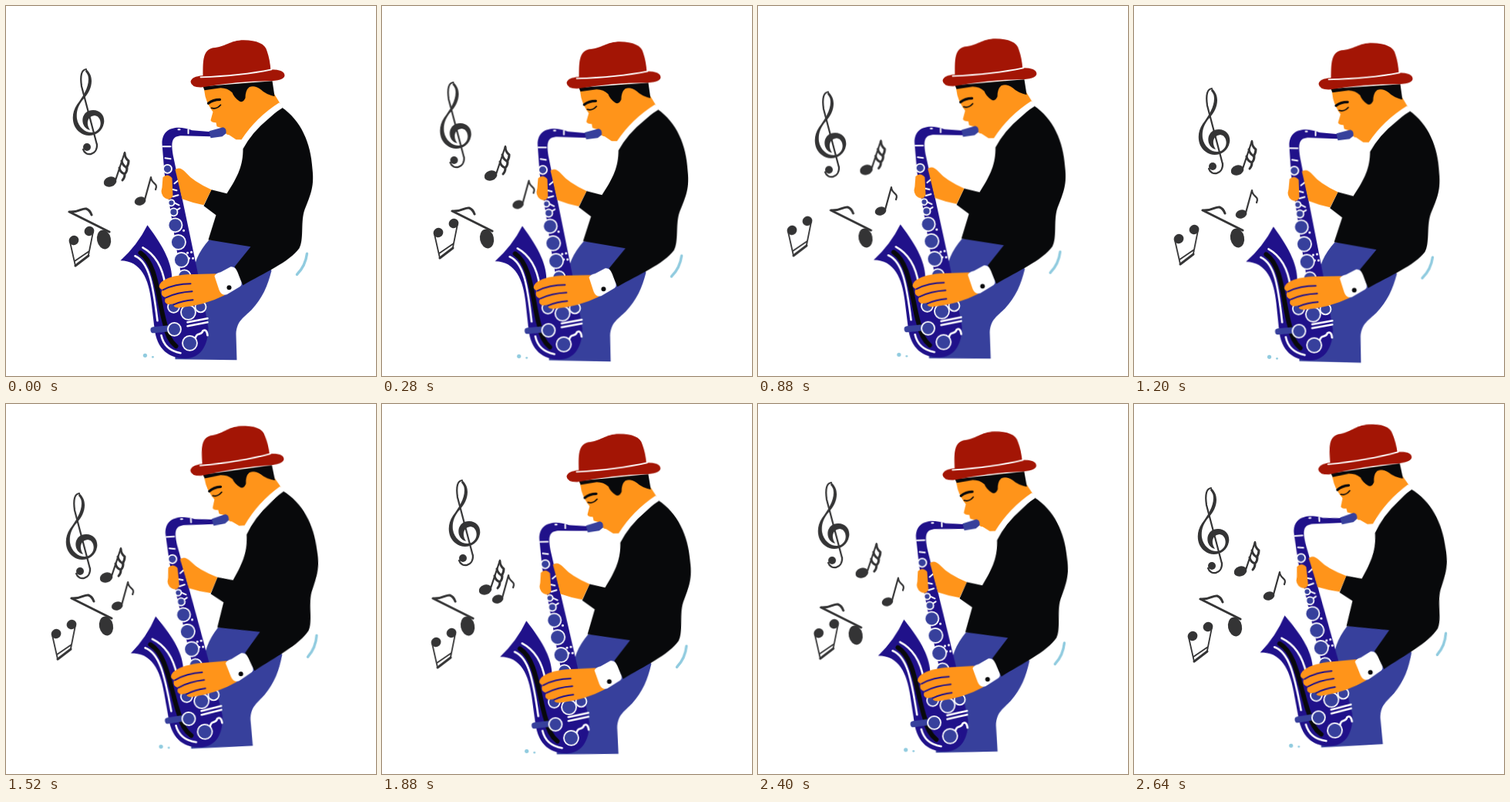
An HTML page for the animation above (2.68 s loop, 480x480 px).

```html
<!DOCTYPE html>
<html lang="en">
<head>
<meta charset="utf-8">
<title>Saxophone player</title>
<style>
  html, body { margin: 0; width: 100%; height: 100%; overflow: hidden; background: #fff; }
  svg { display: block; width: 100vw; height: 100vh; }
  .line { fill: none; stroke-linecap: round; stroke-linejoin: round; }
  .skin { fill: #ff941a; }
  .navy { fill: #20118a; }
  .blue { fill: #37409c; }
  .red { fill: #a31505; }
  .ink { fill: #08090b; }
  .white { stroke: #fff; }
  .sky { fill: #90cbdf; }
  .keys { fill: #37409c; stroke: #fff; stroke-width: 1.8; }
  .notes { fill: #343435; }
  .notes .line { fill: none; stroke: #343435; stroke-width: 2.2; }
  .notes .thin { stroke-width: 1.8; }
  .notes .bold { stroke-width: 3; }

  #man, .notes g { animation: 2680ms linear infinite; }
  #man {
    animation-name: sway;
    animation-timing-function: cubic-bezier(.37, 0, .63, 1);
    transform-origin: 40px 98px;
  }
  #clef { animation-name: clef; }
  #triple { animation-name: triple; }
  #small { animation-name: small; }
  #large { animation-name: large; }
  #pair { animation-name: pair; }

  @keyframes sway {
    0% { transform: rotate(0deg); animation-timing-function: ease-out; }
    5.6% { transform: rotate(1deg); }
    23.1% { transform: rotate(-2.1deg); }
    41.8%, 79.1% { transform: rotate(1.1deg); }
    60.4%, 97.8%, 100% { transform: rotate(-3.8deg); }
  }
  @keyframes clef {
    20.9% { transform: translate(-23px, 34px); }
    44.8% { transform: translate(-3px, 25px); }
    56.7% { transform: translate(-9px, 34px); }
    70.1% { transform: translate(0, 17px); }
    82.1% { transform: translate(-13px, 14px); }
    98.5%, 100% { transform: translate(-4px, 27px); }
  }
  @keyframes triple {
    20.9% { transform: translate(12px, -16px); }
    44.8% { transform: translate(-1px, -15px); }
    56.7% { transform: translate(-5px, -3px); }
    70.1% { transform: translate(-1px, 13px); }
    82.1% { transform: translate(-3px, -7px); }
    98.5%, 100% { transform: translate(3px, -11px); }
  }
  @keyframes small {
    20.9% { transform: translate(5px, 9px); }
    44.8% { transform: translate(-35px, 17px); }
    70.1% { transform: translate(-24px, 0); }
    82.1% { transform: translate(-12px, 10px); }
    98.5%, 100% { transform: translate(1px, -4px); }
  }
  @keyframes large {
    20.9% { transform: translate(18px, -2px); }
    44.8% { transform: translate(7px, -2px); }
    56.7% { transform: translate(3px, -15px); }
    70.1% { transform: translate(-16px, -15px); }
    82.1% { transform: translate(-4px, 6px); }
    98.5%, 100% { transform: translate(4px, -14px); }
  }
  @keyframes pair {
    20.9% { transform: translate(-30px, -20px); }
    32% { transform: translate(-45px, -14px); }
    44.8% { transform: translate(-30px, -2px); }
    56.7% { transform: translate(-23px, -6px); }
    70.1% { transform: translate(-18px, 5px); }
    82.1% { transform: translate(-7px, -10px); }
    98.5%, 100% { transform: translate(-12px, -3px); }
  }
</style>
</head>
<body>
<svg viewBox="0 0 480 480">
  <g id="man"><g transform="translate(-.5 1.3)">
    <path class="blue" d="M264 302 C250 318 243 334 243 352 L220 400 L220 457 L300 458 L299 424 C300 407 309 403 319 393 C333 378 340 362 345 342 L318 306Z"/>

    <!-- head -->
    <path class="skin" d="M257 104 L259 116 Q262 127 269 136 L266 147 Q267 150 273 150 L274 155 L284 158 Q284 166 290 166 L299 172 L307 172 L322 156 L356 125 L348 112 L320 98Z"/>
    <path class="ink" d="M256 103 L346 96 L349 116 Q337 113 331 107 Q323 101 316 104 Q311 108 311 118 Q308 125 303 122 Q296 117 294 111 Q288 105 279 105 L258 108Z"/>
    <path class="line" stroke="#08090b" stroke-width="3.3" d="M263 125 Q269 120 278 120"/>
    <path class="line" stroke="#08090b" stroke-width="1.7" d="M267 131 Q274 133 279 127"/>
    <path class="red" d="M256 91 C256 72 255 56 269 53 C285 52 291 43 309 43 C326 43 337 48 339 57 Q343 68 344 83Z"/>
    <path class="red" d="M240 97 Q241 90 256 89 Q302 88 344 81 Q362 81 362 89 Q361 96 340 96 Q303 96 256 104 Q241 105 240 97Z"/>
    <path class="line white" stroke-width="1.8" d="M253 91 Q306 89 345 81"/>

    <!-- jacket -->
    <path class="ink" d="M358 130 C383 147 396 176 398 210 C401 236 394 246 387 266 C383 281 387 302 381 313 C368 331 335 345 308 361 L297 337 L318 311 L263 302 L273 270 L257 258 L267 237 L287 242 C302 219 308 205 308 184 Q320 162 341 145Z"/>
    <path fill="#fff" d="M306 172 Q325 143 355 124 L359 131 Q328 150 309 179Z"/>

    <!-- saxophone -->
    <path class="navy" d="M267 162 L242 160 C224 153 203 155 203 177 L206 215 L222 315 L231 365 L216 355 C216 333 207 314 184 283 Q171 309 149 329 C176 329 186 354 189 382 L193 416 C196 445 213 456 233 456 C253 456 263 439 263 416 L257 382 L240 300 L218 196 C214 175 215 167 229 167 L267 168Z"/>
    <path class="blue" d="M264 161 L282 156 Q287 157 286 164 L281 168 L266 170Z"/>
    <path class="line" stroke="#08090b" stroke-width="6" d="M175 319 C197 334 197 379 207 412 Q210 431 221 440"/>
    <g class="line white" stroke-width="2.6">
      <path d="M168 323 C186 331 191 358 197 407"/>
      <path d="M178 312 C196 322 204 340 207 360"/>
      <path d="M202 426 Q206 445 227 449"/>
      <path d="M236 409 L262 404 M236 414 L262 409"/>
      <path d="M246 431 C247 421 254 427 256 420 Q261 417 262 426"/>
      <path stroke-width="2" d="M204 181 h10 M237 159 v5 M224 159 h2"/>
      <path stroke-width="2" d="M207 196 l7 1 M219 229 l5 -4 M214 236 l8 2 M217 246 l7 -2 M217 253 l8 4 M221 264 l5 -3"/>
      <path stroke-width="3" d="M231 290 h.1 M236 319 h.1 M241 318 h.1 M238 326 h.1 M243 326 h.1"/>
    </g>
    <path class="line" stroke="#37409c" stroke-width="8" stroke-linecap="butt" d="M192 419 L212 417"/>
    <g class="keys">
      <circle cx="210" cy="210" r="5.5"/>
      <circle cx="215" cy="254" r="4"/>
      <circle cx="218" cy="266" r="5"/>
      <circle cx="220" cy="283" r="9"/>
      <circle cx="224" cy="305" r="9.5"/>
      <circle cx="228" cy="328" r="9.5"/>
      <circle cx="232" cy="349" r="8"/>
      <circle cx="218" cy="389" r="7.5"/>
      <circle cx="253" cy="389" r="7"/>
      <circle cx="237" cy="396" r="9.5"/>
      <circle cx="219" cy="418" r="8.5"/>
      <circle cx="239" cy="436" r="9.5"/>
    </g>

    <!-- hands -->
    <path class="skin" d="M220 211 Q226 206 234 215 Q243 226 267 237 L257 257 Q242 254 229 249 L222 219Z"/>
    <path class="skin" d="M204 221 Q210 215 216 222 L217 245 Q214 252 207 248 Q200 243 203 234Z"/>
    <path class="skin" d="M273 346 L235 347 Q211 349 202 357 Q196 363 203 367 Q200 375 208 377 Q204 383 211 386 L219 385 Q216 391 227 390 Q258 387 284 374Z"/>
    <path class="line" stroke="#20118a" stroke-width="2" d="M204 367 Q220 359 240 359 M208 377 Q223 370 242 369 M218 386 Q230 381 243 380"/>
    <path fill="#fff" d="M271 349 Q273 345 279 344 L292 337 Q298 336 301 344 L306 357 Q307 362 302 364 L287 373 Q280 375 277 367Z"/>
    <circle class="ink" cx="290" cy="364" r="3"/>

    <path class="line" stroke="#90cbdf" stroke-width="3.4" d="M391 320 Q389 336 378 347"/>
    <circle class="sky" cx="181" cy="452" r="2.6"/>
    <circle class="sky" cx="191" cy="454" r="1.4"/>
  </g></g>

  <g class="notes">
    <g id="clef">
      <path class="line" d="M118 180 L98 104 Q95 83 104 82 M118 179 C119 194 103 196 100 186"/>
      <path d="M104 82 C116 92 111 110 101 120 C93 129 91 138 92 146 C94 160 108 167 116 163 C126 158 124 143 115 142 C106 143 103 152 109 161 C97 158 96 141 107 136 C121 132 129 142 127 152 C124 168 106 172 96 164 C85 156 84 140 92 128 C100 117 107 106 107 95 Q107 89 103 85Z"/>
      <circle cx="105" cy="183" r="5"/>
    </g>
    <g id="triple">
      <ellipse cx="135" cy="228" rx="8.5" ry="6.5" transform="rotate(-20 135 228)"/>
      <path class="line" d="M142 226 L154 190"/>
      <path class="line bold" d="M154 191 q0 6 5 10 q0 5 -3 9 M150 201 q1 6 7 9 q0 5 -3 8 M147 210 q1 6 7 8 q0 5 -3 8"/>
    </g>
    <g id="small">
      <ellipse cx="174" cy="253" rx="7.5" ry="5.5" transform="rotate(-18 174 253)"/>
      <path class="line" d="M180 251 L188 222 C188 231 198 229 194 238"/>
    </g>
    <g id="large">
      <ellipse cx="127" cy="303" rx="9" ry="12.5" transform="rotate(-12 127 303)"/>
      <path class="line bold" d="M134 293 L82 267 C95 268 98 262 104 263 Q109 265 111 271"/>
    </g>
    <g id="pair">
      <ellipse cx="88" cy="304" rx="6.5" ry="6" transform="rotate(-30 88 304)"/>
      <ellipse cx="108" cy="292" rx="6.5" ry="6" transform="rotate(-30 108 292)"/>
      <path class="line thin" d="M83 306 L90 337 M113 293 L107 323 M89 331 L108 318"/>
      <path class="line bold" d="M90 337 L107 324"/>
    </g>
  </g>
</svg>
</body>
</html>
```
